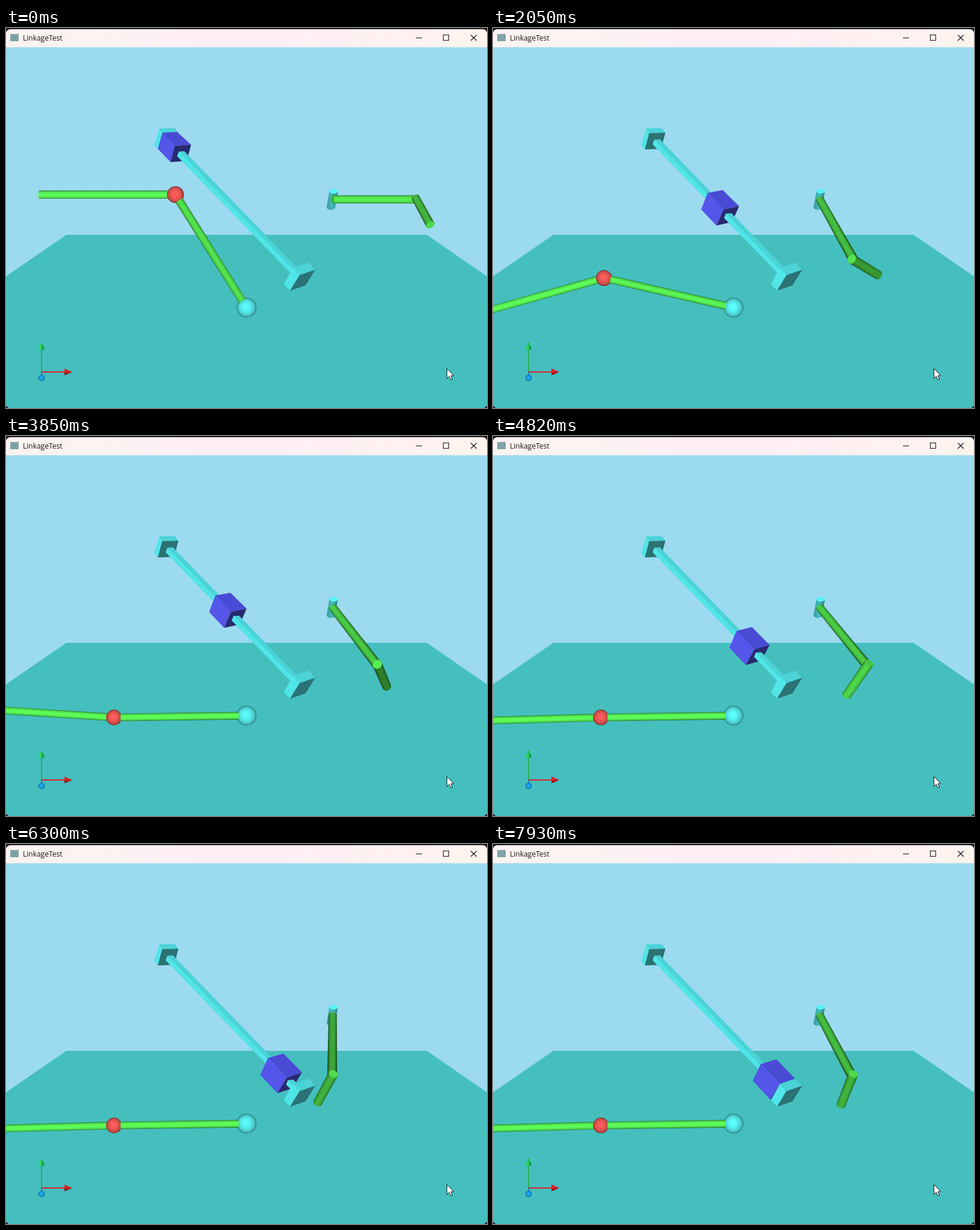
An HTML page with a canvas that plays this animation: 798 by 632 pixels, repeating every 7.99 s.

```html
<!DOCTYPE html>
<html lang="en">
<head>
<meta charset="utf-8">
<title>LinkageTest</title>
<style>
  html, body { margin: 0; width: 100%; height: 100%; overflow: hidden; background: #1c1c1c; }
  canvas { position: absolute; left: 0; top: 0; display: block; }
  .title {
    position: absolute; left: 28px; top: 8px; color: #161616;
    font: 12px/17px "Open Sans", "Noto Sans", sans-serif; white-space: nowrap;
  }
</style>
</head>
<body>
<canvas id="stage" width="798" height="632"></canvas>
<div class="title">LinkageTest</div>
<script>
const LOOP = 7990;
const RELEASE = 630;
const ctx = document.getElementById('stage').getContext('2d');
const { sin, cos, exp, sqrt, hypot, asin, PI } = Math;
const RAD = PI / 180;
const GREEN = [92, 255, 88];
const CYAN = [92, 253, 255];
const RED = [255, 94, 90];

const shade = (c, k) => `rgb(${c.map(v => Math.round(v * k)).join()})`;
const mix = (a, b, q) => a.map((v, i) => v + (b[i] - v) * q);
const dot = (a, b) => a.reduce((sum, v, i) => sum + v * b[i], 0);
const along = (p, d, k) => p.map((v, i) => v + d[i] * k);
const unit = a => a.map(v => v / hypot(...a));

// Height of a dropped body, 1 to 0 in `fall` seconds, with weakening rebounds.
function drop(t, fall, bounce) {
  let u = t / fall;
  if (u < 1) return 1 - u * u;
  u -= 1;
  for (let e = bounce; e > .01; e *= .51) {
    if (u < 2 * e) return u * (2 * e - u);
    u -= 2 * e;
  }
  return 0;
}

// Catmull-Rom curve through [time, value] points.
function spline(pts, t) {
  const last = pts.length - 1;
  const at = i => pts[Math.max(0, Math.min(last, i))];
  if (t >= pts[last][0]) return pts[last][1];
  const i = pts.findIndex(p => p[0] > t) - 1;
  const [a, b] = [at(i), at(i + 1)];
  const slope = j => j === 0 ? 0 : (at(j + 1)[1] - at(j - 1)[1]) / (at(j + 1)[0] - at(j - 1)[0]);
  const h = b[0] - a[0], u = (t - a[0]) / h, w = 1 - u;
  return a[1] * (1 + 2 * u) * w * w + b[1] * u * u * (3 - 2 * u)
    + h * u * w * (w * slope(i) - u * slope(i + 1));
}

function poly(fill, ...pts) {
  ctx.beginPath();
  pts.forEach(p => ctx.lineTo(p[0], p[1]));
  ctx.closePath();
  ctx.fillStyle = fill;
  ctx.fill();
}

function oval(fill, x, y, rx, ry) {
  ctx.beginPath();
  ctx.ellipse(x, y, rx, ry, 0, 0, 7);
  ctx.fillStyle = fill;
  ctx.fill();
}

function line(color, width, x0, y0, x1, y1) {
  ctx.beginPath();
  ctx.moveTo(x0, y0);
  ctx.lineTo(x1, y1);
  ctx.strokeStyle = color;
  ctx.lineWidth = width;
  ctx.stroke();
}

// Colour stops of a surface lit from the viewer; u runs from -1 to 1 across it.
function roundStops(gradient, color, light, from) {
  for (let i = 0; i <= 10; i++) {
    const u = from + (1 - from) * i / 10;
    gradient.addColorStop(i / 10, shade(color, light * (.45 + .55 * sqrt(1 - u * u))));
  }
  return gradient;
}

function ball(x, y, r, color) {
  const g = ctx.createRadialGradient(x - r * .1, y - r * .1, 0, x, y, r);
  oval(roundStops(g, color, 1, 0), x, y, r, r);
}

function rod(x0, y0, x1, y1, w0, w1, light, cap = 0, face = 0) {
  const len = hypot(x1 - x0, y1 - y0), depth = Math.abs(cap);
  ctx.save();
  ctx.translate(x0, y0);
  ctx.rotate(Math.atan2(y1 - y0, x1 - x0));
  const g = roundStops(ctx.createLinearGradient(0, -w0 / 2, 0, w0 / 2), GREEN, light, -1);
  oval(g, len, 0, depth * w1 / 2, w1 / 2);
  oval(g, 0, 0, depth * w0 / 2, w0 / 2);
  poly(g, [0, -w0 / 2], [len, -w1 / 2], [len, w1 / 2], [0, w0 / 2]);
  if (cap > 0) oval(shade(GREEN, face), 0, 0, depth * w0 / 2, w0 / 2);
  if (cap < 0) oval(shade(GREEN, face), len, 0, depth * w1 / 2, w1 / 2);
  ctx.restore();
}

function drawBackdrop() {
  ctx.fillStyle = '#1c1c1c';
  ctx.fillRect(0, 0, 798, 632);
  ctx.save();
  ctx.beginPath();
  ctx.roundRect(0, 2, 798, 630, 7);
  ctx.clip();
  ctx.fillStyle = '#9cdaef';
  ctx.fillRect(0, 32, 798, 600);
  poly('#44bfbe', [100, 344], [698, 344], [798, 413], [798, 632], [0, 632], [0, 413]);
  const bar = ctx.createLinearGradient(0, 0, 798, 0);
  bar.addColorStop(0, '#fef3f0');
  bar.addColorStop(.5, '#fff0f6');
  bar.addColorStop(1, '#fff3ee');
  ctx.fillStyle = bar;
  ctx.fillRect(0, 2, 798, 30);
  ctx.restore();

  ctx.fillStyle = '#7fa3a8';
  ctx.fillRect(7, 10, 14, 12);
  line('#111', 1, 680, 16.5, 690, 16.5);
  ctx.strokeRect(725.5, 11.5, 9, 9);
  line('#111', 1.1, 771, 11.5, 781, 21);
  line('#111', 1.1, 781, 11.5, 771, 21);
}

// Corners: back left, back right, front right, bottom, far left, nearest.
const HIGH = [[260, 174], [284, 173], [307, 194], [273, 223], [252, 201], [280, 196]];
const LOW = [[444, 366], [470, 358], [501, 390], [460, 425], [431, 394], [476, 399]];
const TOP_STOP = [[254, 167], [280, 166.5], [286, 174], [252, 202], [246, 195], [259, 175]];
const END_STOP = [[476, 399], [502, 390], [513, 402], [471, 437], [461, 426], [487, 411]];
const STOP_TINT = ['#4ad2d6', '#51e5e8', '#2a7274'];
const SLIDER_TINT = ['#4a4bd5', '#5455e9', '#29296f'];

function block([top, left, front], [a, b, c, d, e, m]) {
  poly(top, a, b, c, m);
  poly(left, a, m, d, e);
  poly(front, m, c, along(along(c, d, 1), m, -1), d);
}

function rail(q0, q1) {
  const cut = q => [[284, 213], [287, 205.6], [296, 205]].map(p => along(p, [190.7, 197.3], q));
  const [l0, m0, r0] = cut(q0), [l1, m1, r1] = cut(q1);
  poly('#4ad2d6', l0, m0, r0, r1, l1);
  poly('#51e5e8', l0, m0, m1, l1);
}

function drawSlider(t) {
  const s = 1 - drop(t, 1.88, .69);
  const near = 1.22; // how much closer the low end of the rail is
  const q = s / (near - (near - 1) * s);
  block(STOP_TINT, TOP_STOP);
  rail(-.1, q);
  block(SLIDER_TINT, HIGH.map((p, i) => mix(p, LOW[i], q)));
  if (q < .985) rail(q, 1);
  block(STOP_TINT, END_STOP);
}

function drawChain(t) {
  const a = (58.7 * drop(t, 1.623, .211) - .8) * RAD;
  const ca = cos(a), sa = sin(a);
  const x = 399 - (220 + 2 * sa) * ca, y = 465 - (220 + 2 * sa) * sa;

  // The outer rod swings freely until its tip meets the floor, then hops once.
  const h = Math.max(0, Math.min(1, (t - 1.92) / 1.95));
  const floor = 474 - 88 * h * (1 - h);
  const b = Math.min(48 * t * t * RAD, asin((floor - y) / 214));
  const len = 226 - 38 * Math.max(0, sin(b));
  const w = 12.5 + 1.5 * sa;
  rod(x, y, x - len * cos(b), y + len * sin(b), w, w * len / 226, 1, .2);
  ball(x, y, 13 + 1.2 * sa, RED);
  ball(399, 465, 16.5, CYAN);
  rod(x + 11 * ca, y + 11 * sa, 399 - 13 * ca, 465 - 13 * sa, w, 13, 1 - .12 * sa);
}

// Space around the arm's pivot; the eye looks along -z.
const PIVOT = [542, 285];
const EYE = [-143, 47, 617];
const ARM = 139, PENDULUM = 63, RADIUS = 6.8;
const SWING = [[0, 0], [.74, 32], [1.32, 76], [2.06, 90], [3.22, 73], [4.19, 71.5], [5.67, 100], [7.3, 81]];

function project(p) {
  const m = EYE[2] / (EYE[2] - p[2]);
  return [0, 1].map(i => PIVOT[i] + EYE[i] + (p[i] - EYE[i]) * m).concat(m);
}

function rod3d(from, to) {
  const [x0, y0, m0] = project(from), [x1, y1, m1] = project(to);
  const view = unit(along(mix(from, to, .5), EYE, -1));
  const facing = dot(unit(along(to, from, -1)), view);
  const light = sqrt(1 - facing * facing);
  rod(x0, y0, x1, y1, 2 * RADIUS * m0, 2 * RADIUS * m1, light, facing, .5 + .5 * Math.abs(facing));
}

function drawArm(t) {
  const body = ctx.createLinearGradient(533, 0, 550, 0);
  body.addColorStop(0, '#3a9ca0');
  body.addColorStop(.45, '#45bcc0');
  body.addColorStop(1, '#2f8388');
  oval(body, 539, 298, 7, 4.5);
  poly(body, [536.5, 271], [550.5, 272], [546, 299], [532, 298]);
  oval('#57f3f6', 543.5, 271.5, 7, 4);

  const phi = spline(SWING, t) * RAD;
  const phase = 3.5 * t - 1.53 * (1 - exp(-1.5 * t));
  const beta = PI / 2 * exp(-.34 * t) * cos(phase);
  const radial = [cos(phi), .675 * sin(phi), .736 * sin(phi)];
  const tangent = [-sin(phi), .675 * cos(phi), .736 * cos(phi)];
  const axis = [0, .736, -.675];
  const hang = along(axis.map(v => v * cos(beta)), tangent, sin(beta));
  const elbow = radial.map(v => v * ARM);
  rod3d([0, 0, 0], elbow);
  rod3d(along(elbow, hang, -5), along(elbow, hang, PENDULUM));
}

function drawTriad() {
  line('#2cae55', 2, 59, 572, 59, 534);
  poly('#2bd257', [59, 522], [64.5, 535], [53.5, 535]);
  poly('#1c9a40', [59, 522], [64.5, 535], [60, 535]);
  line('#1580c0', 2, 59, 572, 59, 580);
  line('#e02026', 2, 59, 572, 98, 572);
  poly('#e32025', [110, 572], [97, 566.5], [97, 577.5]);
  poly('#951417', [110, 572], [97, 573.5], [97, 577.5]);
  ball(59, 582, 5.3, [24, 172, 250]);
}

function drawPointer() {
  poly('#fff', [731.5, 566.5], [731.5, 583], [735.3, 579.4], [738, 585.3], [740.6, 584.2],
    [738, 578.3], [743, 578]);
  ctx.strokeStyle = '#111';
  ctx.lineWidth = 1;
  ctx.stroke();
}

function draw(ms) {
  const t = Math.max(0, ms - RELEASE) / 1000;
  drawBackdrop();
  drawSlider(t);
  drawChain(t);
  drawArm(t);
  drawTriad();
  drawPointer();
}

function tick() {
  draw(performance.now() % LOOP);
  requestAnimationFrame(tick);
}
tick();
</script>
</body>
</html>
```
